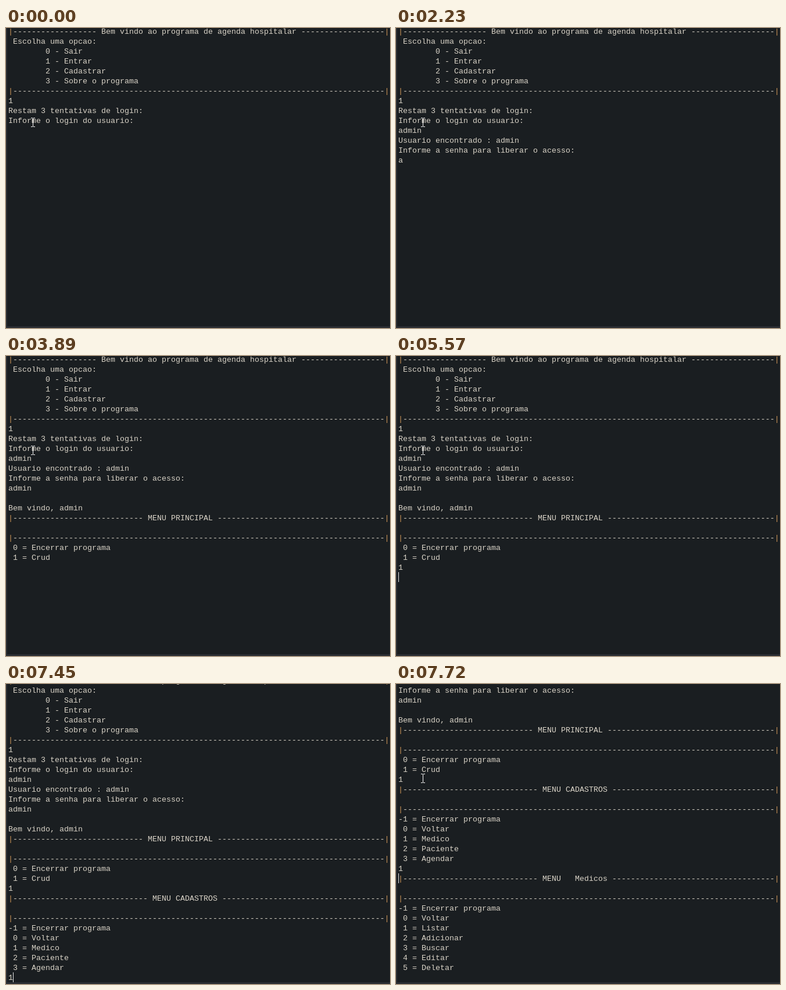
Write an HTML page that moves like this. It is 661x515 px and loops after 8 s.

```html
<!DOCTYPE html>
<html lang="pt">
<head>
<meta charset="utf-8">
<title>Terminal</title>
<style>
  html, body { margin: 0; width: 100%; height: 100%; overflow: hidden; background: #2b2e33; }
  #view { position: absolute; left: 2px; top: 0; width: 659px; height: 512px; overflow: hidden; background: #1a1e21; }
  #page { position: absolute; left: 2px; top: -3px; }
  pre {
    position: absolute; left: 0; top: 1px; margin: 0; color: #d9d3c7;
    font: 13.333px/17px "Liberation Mono", "Courier New", monospace;
  }
  pre i { font-style: normal; color: #cf9558; }
  #caret { position: absolute; width: 1px; height: 17px; background: #e6e6e6; }
  #pointer { position: absolute; left: 43px; top: 154px; }
</style>
</head>
<body>
<div id="view">
  <div id="page"><pre id="text"></pre><div id="caret"></div></div>
</div>
<svg id="pointer" width="7" height="16" fill="none" stroke="#fff" shape-rendering="crispEdges">
  <path d="M0 .5H3M4 .5H7M3.5 1V15M0 15.5H3M4 15.5H7"/>
</svg>
<script>
const LOOP = 8000, COL = 8, ROW = 17, LAST_ROW = 30;
const $ = id => document.getElementById(id);
const text = $('text'), page = $('page'), caret = $('caret'), pointer = $('pointer');

const rule = (title = '', left = 0) =>
  '|' + ('-'.repeat(left) + title).padEnd(80, '-') + '|\n';
const menu = (title, left, items) => rule(` ${title} `, left) + '\n' + rule() + items.join('\n') + '\n';

const intro = rule(' Bem vindo ao programa de agenda hospitalar ', 18) +
  ' Escolha uma opcao:\n' +
  ['Sair', 'Entrar', 'Cadastrar', 'Sobre o programa'].map((s, i) => `        ${i} - ${s}\n`).join('') +
  rule() + '1\nRestam 3 tentativas de login:\nInforme o login do usuario:\n';
const askPassword = 'Usuario encontrado : admin\nInforme a senha para liberar o acesso:\n';
const mainMenu = '\nBem vindo, admin\n' +
  menu('MENU PRINCIPAL', 28, [' 0 = Encerrar programa', ' 1 = Crud']);
const submenu = (title, names) => menu(title, 29,
  ['-1 = Encerrar programa', ...names.map((s, i) => ` ${i} = ${s}`)]);

// Typing moves the caret to the end; printed output leaves it where it is.
const steps = [];
const add = (t, change) => steps.push({ t, ...change });
const type = (t, s, hidden = false) => add(t, { s, typed: true, on: true, hidden });
const print = (t, s) => add(t, { s, hidden: false });
const blink = (t, on) => add(t, { on });

print(0, intro);
type(290, 'a', true);
print(410, '');
type(560, 'd');
type(720, 'm');
type(1020, 'i');
type(1140, 'n');
type(1390, '\n');
print(1540, askPassword);
type(1660, 'a');
blink(2230, false);
type(2380, 'd', true);
type(2530, 'm');
type(2780, 'i');
type(3090, 'n');
type(3240, '\n', true);
print(3360, mainMenu);
blink(3890, false);
blink(4410, true);
blink(4920, false);
type(5170, '1');
type(5570, '\n');
print(5720, submenu('MENU CADASTROS', ['Voltar', 'Medico', 'Paciente', 'Agendar']));
blink(6260, false);
blink(6770, true);
blink(7330, false);
type(7450, '1', true);
type(7600, '\n');
print(7720, submenu('MENU   Medicos', ['Voltar', 'Listar', 'Adicionar', 'Buscar', 'Editar', 'Deletar']));

let state = { out: '', row: 0, col: 0, on: false, hidden: false };
const states = steps.map(({ s = '', typed, ...rest }) => {
  state = { ...state, ...rest, out: state.out + s };
  const lines = state.out.split('\n');
  const end = lines.length - 1;
  if (typed) Object.assign(state, { row: end, col: lines[end].length });
  state.scroll = end < LAST_ROW ? 0 : 12 + (end - LAST_ROW) * ROW;
  return state;
});

let shown;
function draw() {
  const t = (performance.now() - start) % LOOP;
  const now = states.filter(s => s.t <= t).pop() || states[0];
  if (now !== shown) {
    shown = now;
    text.innerHTML = now.out.replace(/\|/g, '<i>|</i>');
    page.style.top = -3 - now.scroll + 'px';
    caret.style.left = now.col * COL + 'px';
    caret.style.top = now.row * ROW + 'px';
    caret.style.visibility = now.on ? 'visible' : 'hidden';
    pointer.style.visibility = now.hidden ? 'hidden' : 'visible';
  }
  requestAnimationFrame(draw);
}
const start = performance.now();
draw();
</script>
</body>
</html>
```
